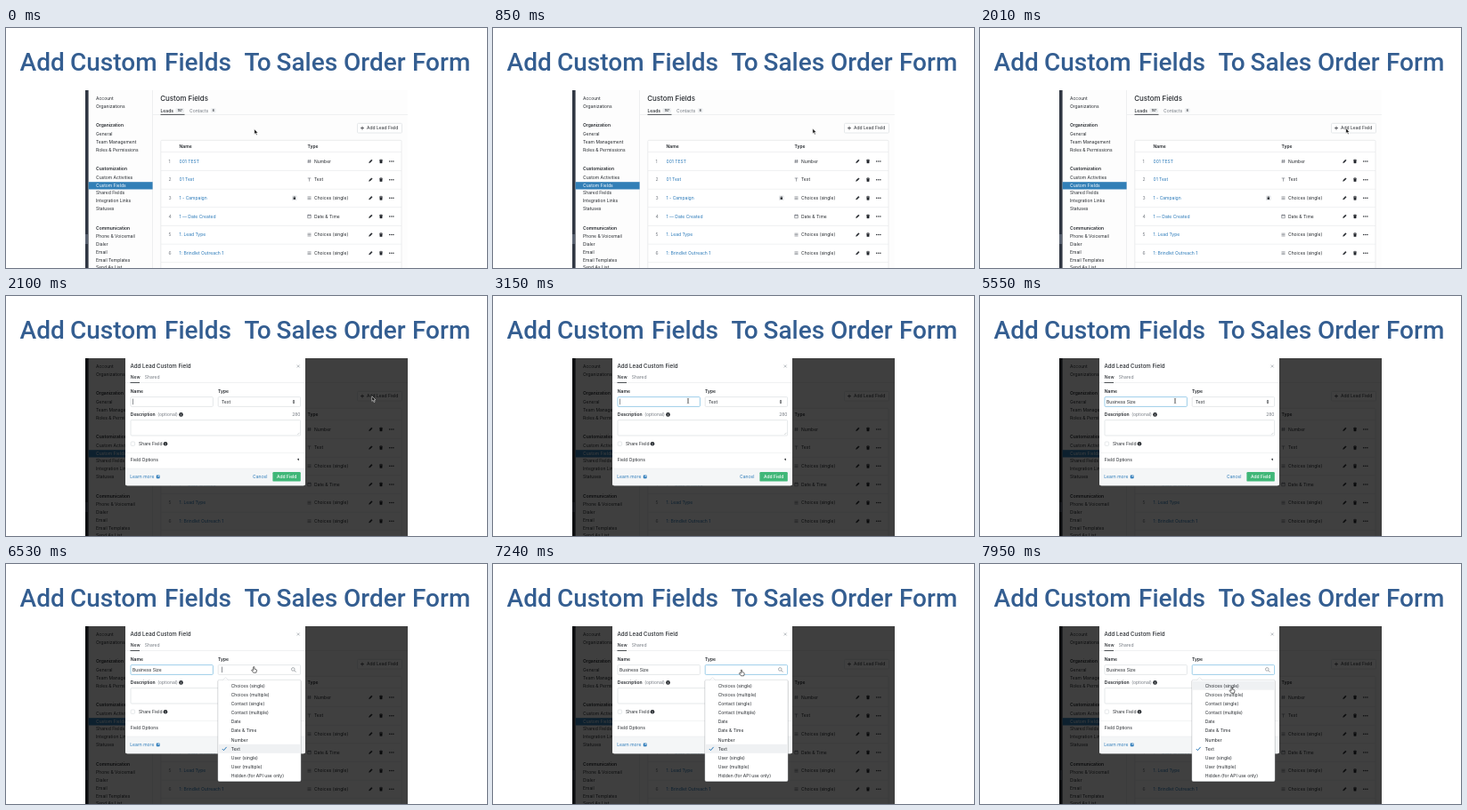
These frames come from a looping animation (540 px wide and 270 px high, 8000 ms). An HTML page:

```html
<!DOCTYPE html>
<html lang="en">
<head>
<meta charset="utf-8">
<title>Add Custom Fields</title>
<style>
html, body { margin: 0; width: 100%; height: 100%; overflow: hidden; background: #fff; }
svg { display: block; width: 540px; height: 270px; font-family: Inter, "Open Sans", sans-serif; }
text { white-space: pre; }
.title { font: 500 28px Roboto, sans-serif; fill: #345e91; }
</style>
</head>
<body>
<svg id="stage" viewBox="0 0 540 270"></svg>
<script>
const LOOP = 8000;
const INK = '#24282d', GRAY = '#737980', LINK = '#2878b8', LINE = '#e6e8ea', EDGE = '#dfe2e5', FOCUS = '#86c2e4';

const text = (x, y, s, { size = 5, fill = INK, weight = 400, anchor = 'start', id = '' } = {}) =>
  `<text id="${id}" x="${x}" y="${y}" font-size="${size}" fill="${fill}" font-weight="${weight}" text-anchor="${anchor}">${s}</text>`;
const rect = (x, y, w, h, fill, more = '') =>
  `<rect x="${x}" y="${y}" width="${w}" height="${h}" fill="${fill}" ${more}/>`;
const path = (d, stroke = INK, width = .7, fill = 'none') =>
  `<path d="${d}" stroke="${stroke}" stroke-width="${width}" fill="${fill}"/>`;
const at = (x, y, s) => `<g transform="translate(${x} ${y})">${s}</g>`;
const group = (id, s) => `<g id="${id}">${s}</g>`;
const box = (x, y, w, h, id = '', stroke = EDGE) =>
  rect(x, y, w, h, '#fff', `id="${id}" rx="1" stroke="${stroke}" stroke-width=".8"`);
const info = (x, y) => at(x, y, `<circle r="2.3" fill="${INK}"/>` + path('M0-1.3v.6M0-.2v1.5', '#fff', .6));

function title() {
  const words = [[15.5, 'Add'], [72, 'Custom'], [178, 'Fields '], [267.5, 'To'], [303.5, 'Sales'], [379, 'Order'], [456, 'Form']];
  return '<text class="title" y="48">' + words.map(([x, s]) => `<tspan x="${x}">${s} </tspan>`).join('') + '</text>';
}

function sidebar() {
  const sections = [
    [72.5, '', 'Account', 'Organizations'],
    [111.3, 'Organization', 'General', 'Team Management', 'Roles &amp; Permissions'],
    [160, 'Customization', 'Custom Activities', 'Custom Fields', 'Shared Fields', 'Integration Links', 'Statuses'],
    [226.6, 'Communication', 'Phone &amp; Voicemail', 'Dialer', 'Email', 'Email Templates', 'Send As List'],
  ];
  return rect(89, 70, 3.6, 200, '#303743') + rect(89, 232, 3, 11, '#596170') +
    rect(164.2, 70, .7, 200, LINE) + rect(92.6, 173.2, 72, 8.3, '#327fb7') +
    sections.map(([y, head, ...items]) => text(101, y, head, { weight: 600 }) +
      items.map((s, i) => text(101, y + (head ? 9.8 : 8.6) + i * 8.7, s,
        { fill: s == 'Custom Fields' ? '#fff' : INK })).join('')).join('');
}

function tableRow([name, icon, type], i) {
  const y = 150 + i * 20.65;
  const list = 'M-2-1.4h4M-2 0h4M-2 1.4h4';
  const icons = { '#': 'M-.7-2l-.6 4M1.2-2l-.6 4M-2-.8h4M-2 .8h4', T: 'M-1.8-1.7h3.6M0-1.7v3.6', list,
    date: 'M-1.8-1.6h3.6v3.4h-3.6zM-1.8-.9h3.6M-1-2.2v1M1-2.2v1' };
  const pencil = path('M-1.8 1.8l.4-1.4L1-2 2-1-.4 1.4z', INK, .3, INK);
  const trash = path('M-1.9-1.4h3.8M-.7-2h1.4', INK, .7) + path('M-1.4-.9h2.8l-.2 3h-2.4z', INK, .3, INK);
  const dots = [-2.1, 0, 2.1].map(x => `<circle cx="${x}" r=".75" fill="${INK}"/>`).join('');
  return text(182.5, y + 1.8, i + 1, { fill: GRAY }) + text(194.5, y + 1.8, name, { fill: LINK }) +
    at(340.5, y, path(icons[icon], '#656b72', .6)) + text(346, y + 1.8, type) +
    at(409.3, y, pencil) + at(421, y, trash) + at(432.8, y, dots) +
    rect(174, y + 10.2, 270, .6, LINE);
}

function page() {
  const rows = [['001 TEST', '#', 'Number'], ['01 Test', 'T', 'Text'], ['1 - Campaign', 'list', 'Choices (single)'],
    ['1 — Date Created', 'date', 'Date &amp; Time'], ['1. Lead Type', 'list', 'Choices (single)'],
    ['1: Brindlet Outreach 1', 'list', 'Choices (single)']];
  const badge = { size: 3.2, weight: 600, anchor: 'middle' };
  return rect(89, 70, 362, 200, '#fdfdfd') + sidebar() +
    text(173.3, 82.3, 'Custom Fields', { size: 7.9, weight: 500 }) +
    rect(165, 97.2, 286, .6, LINE) + rect(173.5, 96.9, 27, .8, INK) +
    text(173.5, 94.5, 'Leads', { weight: 500 }) + rect(190.5, 90.2, 9.5, 5, '#eceef0', 'rx="1"') + text(195.3, 93.9, '107', badge) +
    text(206, 94.5, 'Contacts', { fill: GRAY }) + rect(230, 90.2, 5.5, 5, '#eceef0', 'rx="1"') + text(232.8, 93.9, '6', badge) +
    box(394.5, 107.3, 50, 10.7) + path('M398 112.6h4M400 110.6v4') + text(405, 114.4, 'Add Lead Field') +
    box(173.8, 126.3, 270.2, 150, '', LINE) + rect(174, 139.4, 270, .6, LINE) +
    text(194.5, 135, 'Name', { weight: 600 }) + text(338.5, 135, 'Type', { weight: 600 }) +
    rows.map(tableRow).join('') +
    rect(321, 188.5, 5.6, 5.6, '#e3e5e8', 'rx="1"') + rect(322.6, 190.8, 2.4, 2, INK) + path('M323.1 191v-1.2h1.4v1.2', INK, .5);
}

function menu() {
  const items = ['Choices (single)', 'Choices (multiple)', 'Contact (single)', 'Contact (multiple)', 'Date',
    'Date &amp; Time', 'Number', 'Text', 'User (single)', 'User (multiple)', 'Hidden (for API use only)'];
  return rect(237.4, 130.6, 94.4, 115, '#000', 'opacity=".16" rx="2"') +
    rect(238, 130.3, 93, 114.2, '#fff', 'rx="1.5" stroke="#cfd3d7" stroke-width=".5"') +
    path('M243.5 130.6l3-3 3 3', '#cfd3d7', .5, '#fff') +
    rect(238.3, 0, 92.4, 10, '#eff1f3', 'id="hover"') +
    items.map((s, i) => text(252.7, 138.6 + i * 10.15, s)).join('') +
    path('M242.8 208l1.6 1.7 3.2-3.8', LINK, 1);
}

function modal() {
  return rect(89, 70, 362, 200, '#000', 'opacity=".75"') +
    path('M134 70h202v141.3q0 2-2 2h-198q-2 0-2-2z', 'none', 0, '#fff') +
    path('M134 194h202v17.3q0 2-2 2h-198q-2 0-2-2z', 'none', 0, '#f4f6f7') +
    text(139.5, 81, 'Add Lead Custom Field', { size: 6.15, weight: 500 }) +
    path('M326.7 77.5l3 3M329.7 77.5l-3 3', '#8c9299', .6) +
    text(139.8, 93.3, 'New', { weight: 500 }) + text(155.8, 93.3, 'Shared', { fill: GRAY }) +
    rect(134, 97.3, 202, .6, LINE) + rect(139.5, 97, 10.5, .8, INK) +
    text(139.8, 109, 'Name', { weight: 600 }) + text(238, 109, 'Type', { weight: 600 }) +
    box(140, 113.6, 92.4, 10.8, 'nameBox') + box(238.2, 113.6, 92.4, 10.8, 'typeBox') +
    text(142, 120.8, '', { id: 'typed' }) + rect(0, 115.6, .6, 6.6, '#454a50', 'id="caret"') +
    group('choice', text(242, 120.8, 'Text') + path('M321.7 118.4l1.3-1.6 1.3 1.6zM321.7 119.6l1.3 1.6 1.3-1.6z', 'none', 0, INK)) +
    text(139.8, 135, 'Description', { weight: 600 }) + text(170.3, 135, '(optional)', { fill: GRAY }) + info(196.5, 133.4) +
    text(330.5, 135, '280', { fill: GRAY, anchor: 'end' }) +
    box(140, 139.6, 190.6, 17.4) + path('M327.3 156l2.2-2.2', '#a7acb1', .5) +
    box(140.2, 164, 4.4, 4.4) + text(149, 168, 'Share Field') + info(179, 166.2) +
    rect(134, 176, 202, .5, LINE) + text(139.8, 185.6, 'Field Options') +
    path('M328.8 182.4l-1.9 1.4 1.9 1.4z', 'none', 0, INK) + rect(134, 193.8, 202, .5, LINE) +
    text(139.3, 205, 'Learn more', { fill: LINK }) + rect(168.8, 201.4, 3.8, 3.8, LINK, 'rx=".6"') +
    path('M170 204l1.6-1.6M170.4 202.3h1.3v1.3', '#fff', .5) +
    text(277, 205, 'Cancel', { fill: LINK }) + rect(299.4, 198, 31.4, 10.6, '#40b778', 'rx="1.2"') +
    text(315.2, 205, 'Add Field', { fill: '#fff', weight: 500, anchor: 'middle' }) +
    group('picker', `<circle cx="322.3" cy="118.4" r="1.8" fill="none" stroke="${GRAY}" stroke-width=".6"/>` +
      path('M323.6 119.7l1.8 1.8', GRAY) + menu());
}

const pointers =
  group('arrow', path('M0 0v5.6l1.3-1.2 1 2.3 1-.4-1-2.2h1.8z', '#fff', .5, '#111')) +
  group('beam', path('M-1.2-2.8q1.2 0 1.2 1v3.6q0 1-1.2 1M1.2-2.8q-1.2 0-1.2 1v3.6q0 1 1.2 1', '#444', .55)) +
  group('hand', path('M-.9-3.2q.8-.7 1.3 0v2.3l2 .5q.8.3.6 1.2l-.6 2.4h-3.2l-2-2.6q0-.9.9-.6l1 .6z', '#111', .6, '#fff'));

stage.innerHTML = title() + '<clipPath id="screen"><rect x="89" y="70" width="362" height="200"/></clipPath>' +
  `<g clip-path="url(#screen)">${page()}${group('modal', modal())}${group('pointer', pointers)}</g>`;

const $ = id => document.getElementById(id);
const show = (id, on) => $(id).setAttribute('visibility', on ? 'inherit' : 'hidden');
const set = (id, attrs) => { for (const k in attrs) $(id).setAttribute(k, attrs[k]); };
const lastBefore = (list, t) => list.filter(e => e[0] <= t).pop();

// [first step, last step, number of steps, x, y]
const moves = [[500, 1030, 7, 410.8, 112.8], [2550, 3150, 8, 219, 118], [5730, 6080, 5, 278.5, 119], [7240, 7500, 4, 283, 142]];
function pointerAt(t) {
  let x = 278.8, y = 113.8;
  for (const [start, end, n, toX, toY] of moves) {
    if (t < start) break;
    const k = Math.min(n, 1 + Math.floor((t - start) / (end - start) * (n - 1) + .01)) / n;
    const ease = k * k * (3 - 2 * k);
    x += (toX - x) * ease;
    y += (toY - y) * ease;
  }
  return [x, y];
}

// [time, letters typed] and [time, caret shown]
const keys = [[0, 0], [3870, 1], [4040, 2], [4130, 3], [4210, 4], [4300, 6], [4480, 7], [4660, 9], [4840, 10], [4930, 11], [5020, 12], [5100, 13]];
const blinks = [[0, 0], [2100, 1], [2640, 0], [3150, 1], [3510, 0], [3870, 1], [5550, 0], [5990, 1], [7060, 0], [7500, 1], [7950, 0]];

function draw(t) {
  const open = t >= 6530;
  show('modal', t >= 2100);
  show('picker', open);
  show('choice', !open);
  set('nameBox', { stroke: t >= 2190 && t < 6620 ? FOCUS : EDGE });
  set('typeBox', { stroke: t >= 6620 ? FOCUS : EDGE });

  const typed = $('typed');
  typed.textContent = 'Business Size'.slice(0, lastBefore(keys, t)[1]);
  const typedWidth = typed.textContent ? typed.getComputedTextLength() : 0;
  set('caret', { x: open ? 242 : 142.2 + typedWidth });
  show('caret', lastBefore(blinks, t)[1]);
  set('hover', { y: t >= 7420 ? 131.7 : 202.8 });

  const [x, y] = pointerAt(t);
  const shape = t < 2550 ? 'arrow' : x < 232 ? 'beam' : t >= 5730 && x > 238 ? 'hand' : 'arrow';
  set('pointer', { transform: `translate(${x} ${y})` });
  for (const s of ['arrow', 'beam', 'hand']) show(s, s == shape);
}

function tick() {
  draw(performance.now() % LOOP);
  requestAnimationFrame(tick);
}
tick();
</script>
</body>
</html>
```
